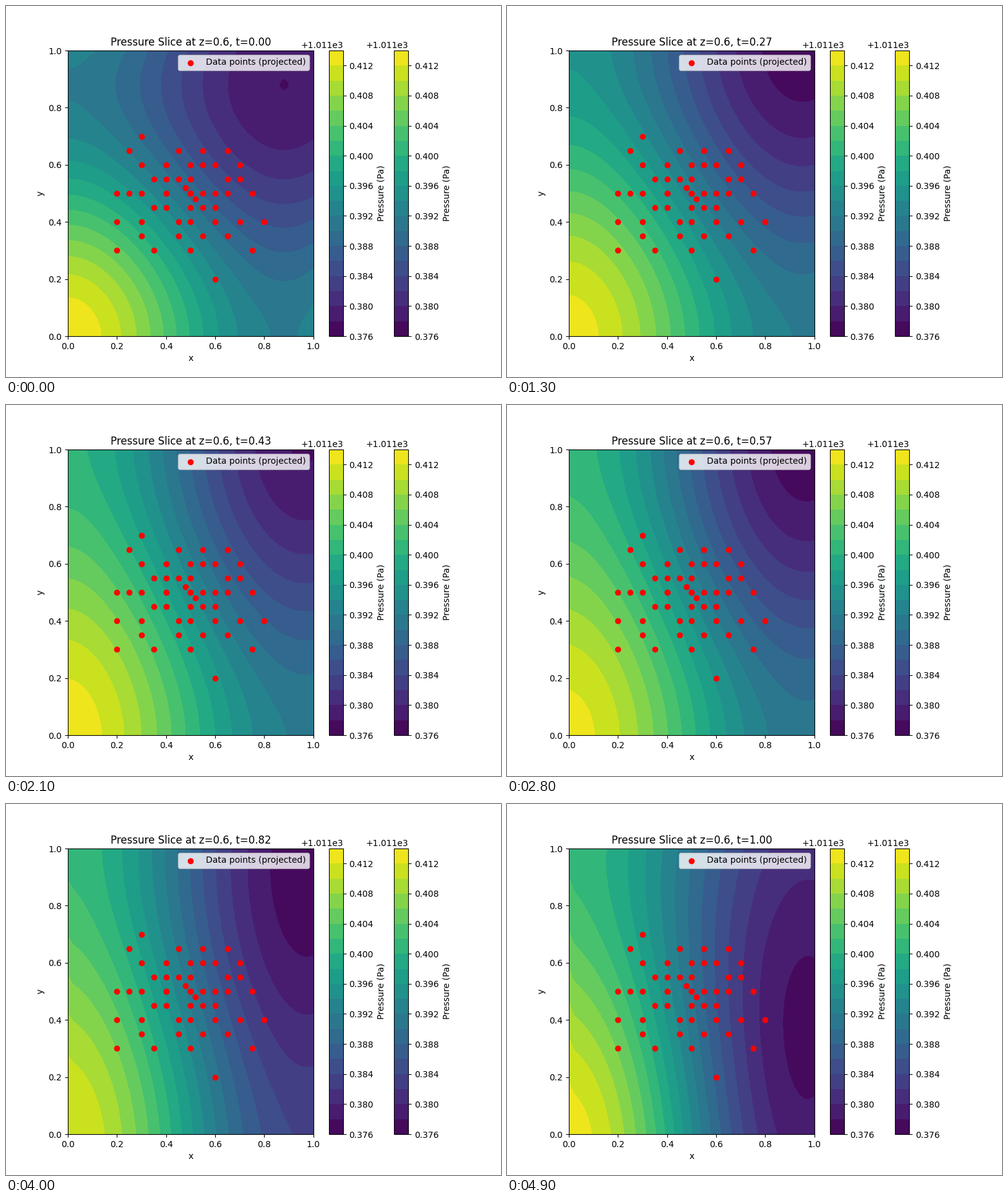
A matplotlib script for the animation above (5 s loop, 800 by 600 pixels).

```python
import numpy as np
import matplotlib.pyplot as plt
from matplotlib.animation import FuncAnimation

FRAMES = 50
BASE, STEP, BANDS = 1011.376, 0.002, 19
LEVELS = BASE + STEP * np.arange(BANDS + 1)

# Corner pressures over time, in steps above BASE
KEY_TIMES = np.array([0, 13, 21, 28, 34, 40, 49]) / (FRAMES - 1)
LOWER_LEFT = [18.75, 18.5, 18.65, 18.4, 18.08, 17.97, 18.5]
LOWER_RIGHT = [7.9, 7.95, 7.85, 7.35, 6.5, 3.9, 1.4]
UPPER_LEFT = [7.9, 9.85, 12.2, 12.45, 13.5, 12.7, 12.7]
UPPER_RIGHT = [0.99, 0.35, 0.88, 0.35, 0.9, 0.4, 2.45]

# Data points: y -> x positions, both in hundredths
POINTS = {
    70: [30],
    65: [25, 45, 55, 65],
    60: [30, 40, 50, 55, 60, 70],
    55: [35, 40, 45, 50, 65, 70],
    52: [48],
    50: [20, 25, 30, 40, 40, 50, 50, 55, 60, 65, 75],
    48: [52],
    45: [35, 40, 50, 55, 60],
    40: [20, 30, 45, 50, 60, 70, 80],
    35: [30, 45, 55, 65],
    30: [20, 35, 50, 75],
    20: [60],
}

grid = np.linspace(0, 1, 50)
X, Y = np.meshgrid(grid, grid)


def ease(s, reach):
    """Cosine ramp from 0 at s = 0 to 1 at s = reach."""
    return (1 - np.cos(np.pi * (s / reach) ** 0.95)) / 2


def mix(a, b, k):
    return a + (b - a) * k


def pressure(t):
    fade = np.exp(-6 * t)
    u = ease(X, 0.97 - 0.09 * fade)
    v = ease(Y, 1.06 - 0.18 * fade)
    ll, lr, ul, ur = (np.interp(t, KEY_TIMES, corner) for corner in
                      (LOWER_LEFT, LOWER_RIGHT, UPPER_LEFT, UPPER_RIGHT))
    sag = 1.2 * t**3 * np.sin(np.pi * Y) * X**0.3
    field = mix(mix(ll, lr, u), mix(ul, ur, u), v) - sag
    return BASE + STEP * np.clip(field, 0.01, BANDS - 0.01)


fig, ax = plt.subplots(figsize=(8, 6), dpi=100)
contour = None


def update(frame):
    global contour
    if contour is not None:
        contour.remove()
    t = frame / (FRAMES - 1)
    contour = ax.contourf(X, Y, pressure(t), levels=LEVELS, cmap="viridis")
    ax.set_title(f"Pressure Slice at z=0.6, t={t:.2f}")


update(0)
for _ in range(2):
    fig.colorbar(contour, ax=ax, label="Pressure (Pa)")

points = np.array([(x, y) for y, xs in POINTS.items() for x in xs]) / 100
ax.scatter(*points.T, color="red", zorder=1.5, label="Data points (projected)")
ax.set(xlim=(0, 1), ylim=(0, 1), xlabel="x", ylabel="y")
ax.legend(loc="upper right")

anim = FuncAnimation(fig, update, frames=FRAMES, interval=100, repeat=True, repeat_delay=0)
plt.show()
```
